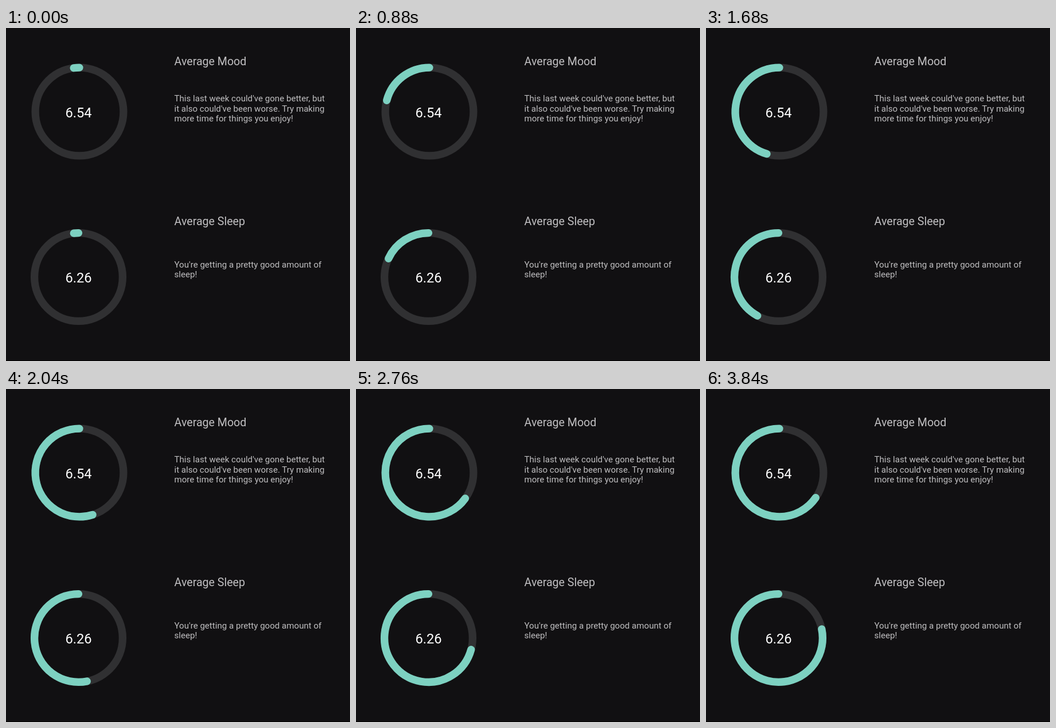
Recreate the animation shown at these times as an HTML page. Size 600x581 px, loop 3.88 s.

```html
<!DOCTYPE html>
<html lang="en">
<head>
<meta charset="utf-8">
<title>Weekly averages</title>
<style>
  html, body { margin: 0; width: 100%; height: 100%; overflow: hidden; background: #111012; }
  svg { display: block; font-family: Roboto, sans-serif; fill: #c0bfc1; }
  circle, path { fill: none; stroke-width: 13.3; }
  circle { stroke: #303032; }
  path { stroke: #7dd1c1; stroke-linecap: round; }
  .value { font-size: 23.7px; fill: #fff; text-anchor: middle; }
  .title { font-size: 19.6px; }
  .note { font-size: 15.1px; }
</style>
</head>
<body>
<svg width="600" height="581" viewBox="0 0 600 581">
  <rect y="580" width="600" height="1" fill="#000"/>

  <circle cx="128" cy="146" r="76.9"/>
  <path id="mood"/>
  <text class="value" x="126.6" y="156">6.54</text>
  <text class="title" x="293.6" y="65">Average Mood</text>
  <text class="note">
    <tspan x="293.5" y="128.3">This last week could've gone better, but</tspan>
    <tspan x="293.5" y="145.8">it also could've been worse. Try making</tspan>
    <tspan x="293.5" y="163.3">more time for things you enjoy!</tspan>
  </text>

  <circle cx="126.5" cy="434.5" r="76.9"/>
  <path id="sleep"/>
  <text class="value" x="126.6" y="444">6.26</text>
  <text class="title" x="293.6" y="344">Average Sleep</text>
  <text class="note">
    <tspan x="293.5" y="417.5">You're getting a pretty good amount of</tspan>
    <tspan x="293.5" y="435">sleep!</tspan>
  </text>
</svg>
<script>
const LOOP = 3880, STEP = 40, HEAD_START = 370, RADIUS = 76.9;
const MS_PER_TURN = 5000;

const gauges = [
  { id: "mood", x: 128, y: 146, fill: 6.54 / 10 },
  { id: "sleep", x: 126.5, y: 434.5, fill: 6.26 / 8 },
];

const easeInOutSine = u => (1 - Math.cos(Math.PI * u)) / 2;

// Counter-clockwise arc from the top; duration grows with the fill.
function drawGauge({ id, x, y, fill }, elapsed) {
  const progress = easeInOutSine(Math.min(1, elapsed / (fill * MS_PER_TURN)));
  const angle = progress * fill * 2 * Math.PI;
  const endX = x - RADIUS * Math.sin(angle);
  const endY = y - RADIUS * Math.cos(angle);
  const large = angle > Math.PI ? 1 : 0;
  document.getElementById(id).setAttribute("d",
    `M${x} ${y - RADIUS}A${RADIUS} ${RADIUS} 0 ${large} 0 ${endX} ${endY}`);
}

const start = performance.now();
function frame() {
  const t = (performance.now() - start) % LOOP;
  const elapsed = Math.floor(t / STEP) * STEP + HEAD_START;
  gauges.forEach(gauge => drawGauge(gauge, elapsed));
  requestAnimationFrame(frame);
}
frame();
</script>
</body>
</html>
```
